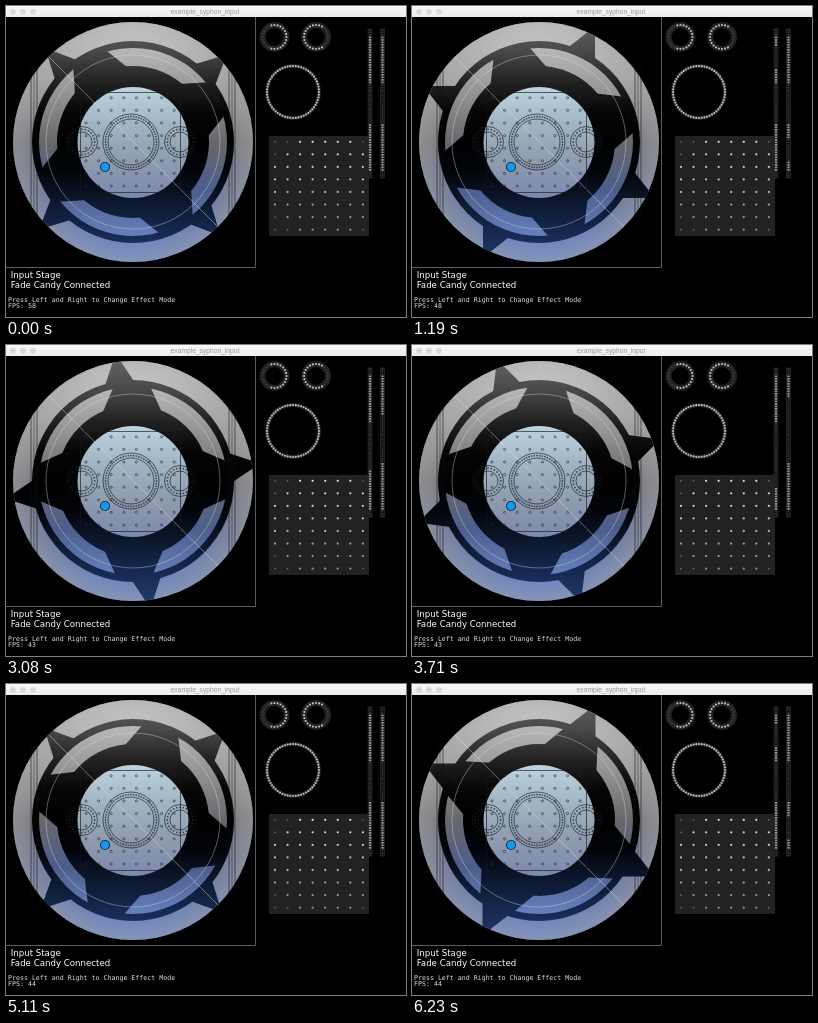
An HTML page with a canvas that plays this animation: 400 px wide and 311 px high, repeating every 6.3 s.

```html
<!DOCTYPE html>
<html lang="en">
<head>
<meta charset="utf-8">
<title>Input stage</title>
<style>
  html, body { margin: 0; width: 100%; height: 100%; overflow: hidden; background: #000; }
  canvas, svg { position: absolute; left: 0; top: 0; width: 400px; height: 311px; display: block; }
  text { fill: #fff; white-space: pre; }
  .title { font: 6.7px "Liberation Sans", Arial, sans-serif; fill: #999; text-anchor: middle; }
  .label { font: 8.65px "DejaVu Sans", Verdana, sans-serif; }
  .mono { font: 6.62px "DejaVu Sans Mono", monospace; fill: #e0e0e0; }
</style>
</head>
<body>
<canvas id="stage" width="400" height="311"></canvas>
<svg viewBox="0 0 400 311">
  <defs>
    <linearGradient id="bar" x1="0" y1="0" x2="0" y2="1">
      <stop offset="0" stop-color="#f8f8f8"/><stop offset="1" stop-color="#ececec"/>
    </linearGradient>
  </defs>
  <rect width="400" height="11" fill="url(#bar)"/>
  <g fill="#d8d8d8"><circle cx="7" cy="5.7" r="2.8"/><circle cx="17" cy="5.7" r="2.8"/><circle cx="27" cy="5.7" r="2.8"/></g>
  <text class="title" x="199" y="8.2">example_syphon_input</text>
  <path d="M249.5 11V261.5H0" fill="none" stroke="#5c5c5c"/>
  <text class="label" x="4.7" y="271.5">Input Stage</text>
  <text class="label" x="4.7" y="282">Fade Candy Connected</text>
  <text class="mono" x="2" y="296">Press Left and Right to Change Effect Mode</text>
  <text class="mono" x="2" y="302.3" id="fps">FPS: 58</text>
</svg>
<script>
const LOOP = 6300, STEP = 70, TAU = Math.PI * 2, RAD = Math.PI / 180;
const CX = 127, CY = 136, RIM = 120, BAND = 101, ARC = 94, HUB = 76, CORE = 55.5;
const FPS = [[0, 58], [350, 53], [910, 48], [1750, 42], [2450, 44], [3010, 43], [3850, 45], [4620, 44]];
const ctx = document.getElementById('stage').getContext('2d');
const fpsText = document.getElementById('fps');

function fade(y0, y1, ...colors) {
  const g = ctx.createLinearGradient(0, y0, 0, y1);
  colors.forEach((c, i) => g.addColorStop(i / (colors.length - 1), c));
  return g;
}
function disc(x, y, r, fill) {
  ctx.beginPath();
  ctx.arc(x, y, r, 0, TAU);
  ctx.fillStyle = fill;
  ctx.fill();
}
function ring(x, y, r, stroke, width = 1) {
  ctx.beginPath();
  ctx.arc(x, y, r, 0, TAU);
  ctx.strokeStyle = stroke;
  ctx.lineWidth = width;
  ctx.stroke();
}
function line(x0, y0, x1, y1, stroke, width = 1) {
  ctx.beginPath();
  ctx.moveTo(x0, y0);
  ctx.lineTo(x1, y1);
  ctx.strokeStyle = stroke;
  ctx.lineWidth = width;
  ctx.stroke();
}
const gray = v => `rgb(${v},${v},${v})`;
const polar = (r, deg) => [CX + r * Math.cos(deg * RAD), CY + r * Math.sin(deg * RAD)];

const rimFill = fade(16, 256, '#cacaca', '#a6a6a8', '#808084', '#7480a0', '#6f8ac8');
const arcFill = fade(42, 230, '#b8b8b8', '#929292', '#68686c', '#4c5e8c', '#6680bc');
const darkFill = fade(16, 256, '#626262', '#484848', '#222', '#050505', '#000', '#02040a', '#0c182e', '#162850', '#223a6a');
const coreFill = fade(81, 192, '#bcd4e0', '#a2b4c2', '#8e9cae', '#7c88ae');
const edgeFill = ctx.createRadialGradient(CX, CY, BAND, CX, CY, RIM);
edgeFill.addColorStop(0, 'rgba(160,160,162,0)');
edgeFill.addColorStop(1, 'rgba(160,160,162,.45)');

const tipAngle = t => 47 - 17.8 * t;
const gapAngle = t => -27.5 + 8.7 * t;
const spikeHalf = r => 2 + 6 * (RIM - r) / (RIM - BAND);

function inBand(dx, dy, tip) {
  const r = Math.hypot(dx, dy);
  if (r < BAND || r > RIM) return false;
  const a = Math.atan2(dy, dx) / RAD - tip;
  return Math.abs(a - 90 * Math.round(a / 90)) > spikeHalf(r);
}

// Four dark wedges, narrow at the outer radius and wide at the inner one.
function wedges(angle, r0, half0, r1, half1) {
  ctx.fillStyle = darkFill;
  for (let q = 0; q < 360; q += 90) {
    ctx.beginPath();
    [[r0, -half0], [r0, half0], [r1, half1], [r1, -half1]]
      .forEach(([r, a]) => ctx.lineTo(...polar(r, angle + q + a)));
    ctx.fill();
  }
}

function drawRotor(t) {
  disc(CX, CY, RIM, rimFill);
  disc(CX, CY, RIM, edgeFill);
  wedges(tipAngle(t), RIM, 2, BAND - 1, 8.3);
  disc(CX, CY, BAND, darkFill);
  disc(CX, CY, ARC, arcFill);
  wedges(gapAngle(t), ARC + 2, 11, HUB - 2, 24);
  disc(CX, CY, HUB, darkFill);
  disc(CX, CY + .5, CORE, coreFill);
}

function drawFixtures() {
  ring(CX, CY, 87, 'rgba(215,220,230,.5)', .8);
  line(43, 51, 212, 221, 'rgba(225,225,230,.5)', .9);

  ctx.strokeStyle = 'rgba(20,24,30,.8)';
  ctx.lineWidth = .8;
  ctx.strokeRect(74.5, 86.5, 100, 100);
  for (let i = 0; i < 64; i++) {
    ring(80 + i % 8 * 12.6, 91.8 + (i >> 3) * 12.6, 1.1, 'rgba(35,42,52,.75)', .8);
  }
  [[125, 28, 23, 60], [76, 15.5, 10, 24], [174, 15.5, 10, 24]].forEach(([x, outer, inner, n]) => {
    ring(x, CY, outer, 'rgba(20,24,30,.8)', .8);
    ring(x, CY, inner, 'rgba(20,24,30,.8)', .8);
    const r = (outer + inner) / 2;
    for (let i = 0; i < n; i++) {
      const a = i / n * TAU;
      disc(x + r * Math.cos(a), CY + r * Math.sin(a), .9, 'rgba(30,36,46,.75)');
    }
  });
  [28, 226].forEach(x => {
    [-3, 0, 3].forEach(d => line(x + d, 61, x + d, 211, d ? 'rgba(15,15,18,.7)' : 'rgba(15,15,18,.5)', .8));
  });
  disc(99, 161, 5, '#0c2236');
  disc(99, 161, 4.2, '#1796ee');
}

function ledRing(x, y, outer, inner, n, srcX) {
  const r = (outer + inner) / 2;
  ring(x, y, r, '#222224', outer - inner);
  for (let i = 0; i < n; i++) {
    const a = i / n * TAU, dx = r * Math.cos(a), dy = r * Math.sin(a);
    const lit = Math.hypot(srcX + dx - CX, dy) < CORE;
    disc(x + dx, y + dy, lit ? 1.1 : .8, lit ? '#b4bfcc' : '#4a4a4a');
  }
}

function drawLeds(t) {
  ledRing(268.5, 31, 15, 9, 24, 76);
  ledRing(310, 31, 15, 9, 24, 174);
  ledRing(287, 86, 28, 24, 60, 125);

  ctx.fillStyle = '#222';
  ctx.fillRect(263, 130, 100, 100);
  for (let i = 0; i < 64; i++) {
    const x = i % 8 * 12.55, y = (i >> 3) * 12.55;
    const lit = Math.hypot(80 + x - CX, 91.8 + y - CY) < CORE;
    disc(269 + x, 135.8 + y, lit ? 1.15 : .9, lit ? gray(Math.round(220 - y * .9)) : '#666');
  }

  const tip = tipAngle(t);
  [[364, -99], [376.5, 99]].forEach(([x, dx]) => {
    ctx.fillStyle = '#2a2a2a';
    ctx.fillRect(x - 2.3, 22.5, 4.6, 150);
    ctx.fillStyle = '#000';
    ctx.fillRect(x - 1.2, 22.5, 2.4, 150);
    for (let i = 0; i < 60; i++) {
      const dy = -74 + i * 2.5;
      ctx.fillStyle = inBand(dx, dy, tip) ? '#9a9a9c' : '#2e2e2e';
      ctx.fillRect(x - 1.1, 97 + dy, 2.2, 1.8);
    }
  });
}

function render() {
  const ms = Math.floor(performance.now() % LOOP / STEP) * STEP;
  const t = ms / 1000;
  ctx.clearRect(0, 0, 400, 311);
  drawRotor(t);
  drawFixtures();
  drawLeds(t);
  fpsText.textContent = 'FPS: ' + FPS.filter(([at]) => at <= ms).pop()[1];
  requestAnimationFrame(render);
}
render();
</script>
</body>
</html>
```
